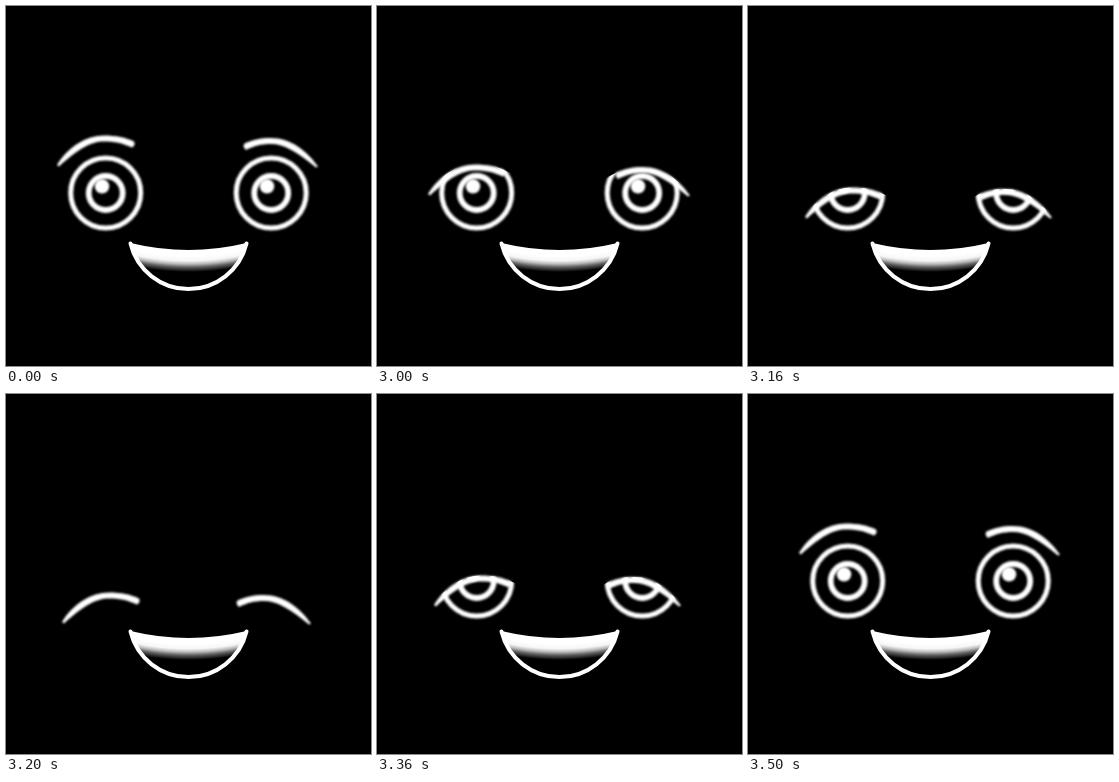
An HTML page with a canvas for the animation above (3600 ms loop, 365x360 px).

```html
<!DOCTYPE html>
<html lang="en">
<head>
<meta charset="utf-8">
<title>Blinking face</title>
<style>
html, body { margin: 0; width: 100%; height: 100%; overflow: hidden; background: #000; }
canvas { display: block; }
</style>
</head>
<body>
<canvas id="stage" width="365" height="360"></canvas>
<script>
const ctx = document.getElementById('stage').getContext('2d');
const LOOP = 3600, HOLD = 3000, STEP = 100;
const SOFT = 'blur(0.8px)';

// Lid offsets per pose: left x, right x, left y, right y
const POSES = [
  [0, 0, 0, 0],
  [0, 1, 29, 29],
  [6, -8, 52, 51],
  [5, -7, 69, 69]
];
const BLINK = [1, 2, 3, 2, 1, 0];

// Each lid is a tapered crescent; the cover hides the eye above it.
function makeEye(x, y, glintX, glintY, top, under, cover) {
  return {
    x, y, glintX, glintY,
    lid: new Path2D(top + under + 'Z'),
    cover: new Path2D(top + cover + 'Z')
  };
}

const left = makeEye(99.7, 187, 96, 180.3,
  'M51 159C62 141 80 129.5 98 129.5C110 129.5 120 131.5 128 135.5',
  'Q130 139 126 141.5C116 137 108 135.5 98 135.5C85 135.5 72 143 53 160.5',
  'L147 143V60H30V165');
const right = makeEye(265.2, 187, 261, 180.3,
  'M312 160.5C301 145 285 132 265 132C254 132 246 134 238.5 137.5',
  'Q236 140.5 240 144C248 140 255 138 265 138C278 138 291 146 310 161.5',
  'L220 147V60H335V167');

function disc(x, y, r) {
  ctx.beginPath();
  ctx.arc(x, y, r, 0, Math.PI * 2);
}

function drawEye(eye, dx, dy, pose) {
  ctx.save();
  ctx.filter = SOFT;
  ctx.strokeStyle = ctx.fillStyle = '#fff';
  if (pose < 3) {
    ctx.lineWidth = 5;
    disc(eye.x, eye.y, 35);
    ctx.stroke();
    ctx.lineWidth = 5.8;
    disc(eye.x, eye.y, 17);
    ctx.stroke();
    disc(eye.glintX, eye.glintY, 7.3);
    ctx.fill();
  }
  ctx.translate(dx, dy);
  if (pose > 0) {
    ctx.filter = 'none';
    ctx.fillStyle = '#000';
    ctx.fill(eye.cover);
    ctx.filter = SOFT;
    ctx.fillStyle = '#fff';
  }
  ctx.fill(eye.lid);
  ctx.restore();
}

function drawMouth() {
  const jaw = 'A59.7 59.7 0 0 ';
  const mouth = new Path2D('M124.5 237Q182.5 251 240.5 237' + jaw + '1 124.5 237Z');
  const teeth = ctx.createRadialGradient(182.5, 0, 250, 182.5, 0, 266);
  teeth.addColorStop(0, '#fff');
  teeth.addColorStop(0.3, '#f6f6f6');
  teeth.addColorStop(0.5, '#bbb');
  teeth.addColorStop(0.7, '#606060');
  teeth.addColorStop(1, '#000');
  ctx.save();
  ctx.filter = 'blur(0.4px)';
  ctx.fillStyle = teeth;
  ctx.fill(mouth);
  ctx.strokeStyle = '#fff';
  ctx.lineWidth = 4;
  ctx.lineCap = 'round';
  ctx.stroke(new Path2D('M124.5 237.5' + jaw + '0 240.5 237.5'));
  ctx.restore();
}

function poseAt(t) {
  return t < HOLD ? 0 : BLINK[Math.floor((t - HOLD) / STEP)];
}

function draw(t) {
  const pose = poseAt(t);
  const [lx, rx, ly, ry] = POSES[pose];
  ctx.fillStyle = '#000';
  ctx.fillRect(0, 0, 365, 360);
  drawEye(left, lx, ly, pose);
  drawEye(right, rx, ry, pose);
  drawMouth();
}

const start = performance.now();
function tick() {
  draw((performance.now() - start) % LOOP);
  requestAnimationFrame(tick);
}
tick();
</script>
</body>
</html>
```
